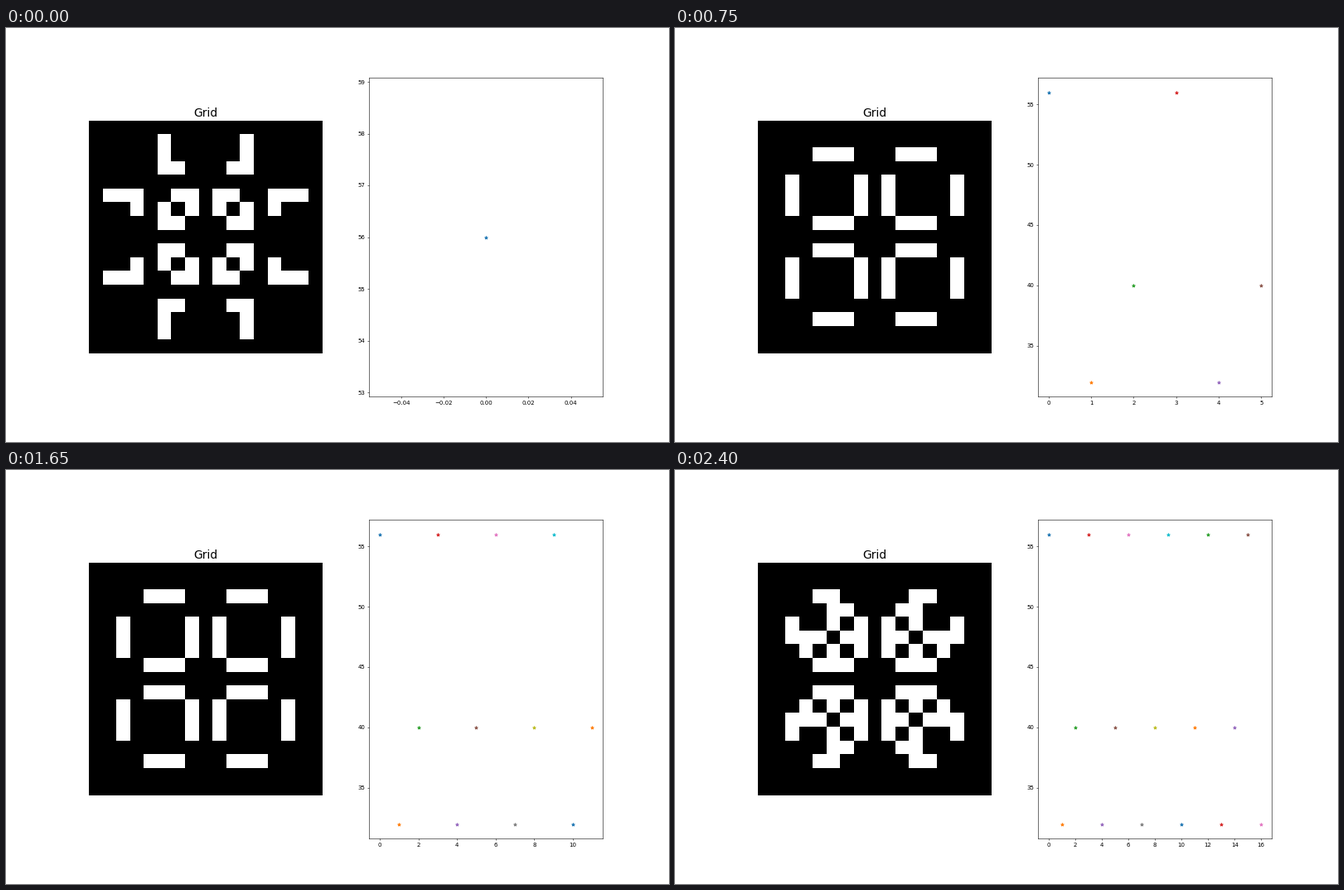
A matplotlib script that plays this animation: 800 px wide and 500 px high, repeating every 2.55 s.

```python
import numpy as np
import matplotlib.pyplot as plt
from matplotlib.animation import FuncAnimation

SIZE = 17
FRAMES = 17
INTERVAL = 150
ACTIVITY = (56, 32, 40)


def pulsar():
    """Pulsar oscillator in its 48-cell phase."""
    grid = np.zeros((SIZE, SIZE), dtype=int)
    arms = [4, 5, 6, 10, 11, 12]
    for line in (2, 7, 9, 14):
        grid[line, arms] = 1
        grid[arms, line] = 1
    return grid


def step(grid):
    """One Game of Life generation on a wrapped board."""
    near = sum(np.roll(grid, (dy, dx), (0, 1))
               for dy in (-1, 0, 1) for dx in (-1, 0, 1) if dy or dx)
    return ((near == 3) | ((grid == 1) & (near == 2))).astype(int)


phases = [step(pulsar())]
for _ in range(2):
    phases.append(step(phases[-1]))

fig, (board, chart) = plt.subplots(1, 2, figsize=(16, 10), dpi=50)
board.set_title("Grid", fontsize=20)
board.axis("off")
image = board.imshow(phases[0], cmap="gray", vmin=0, vmax=1,
                     interpolation="nearest")


def update(frame):
    image.set_data(phases[frame % 3])
    chart.cla()
    for t in range(frame + 1):
        chart.plot(t, ACTIVITY[t % 3], "*")
    return []


def reset():
    return update(0)


anim = FuncAnimation(fig, update, frames=FRAMES, init_func=reset,
                     interval=INTERVAL, repeat=True, repeat_delay=0)
plt.show()
```
